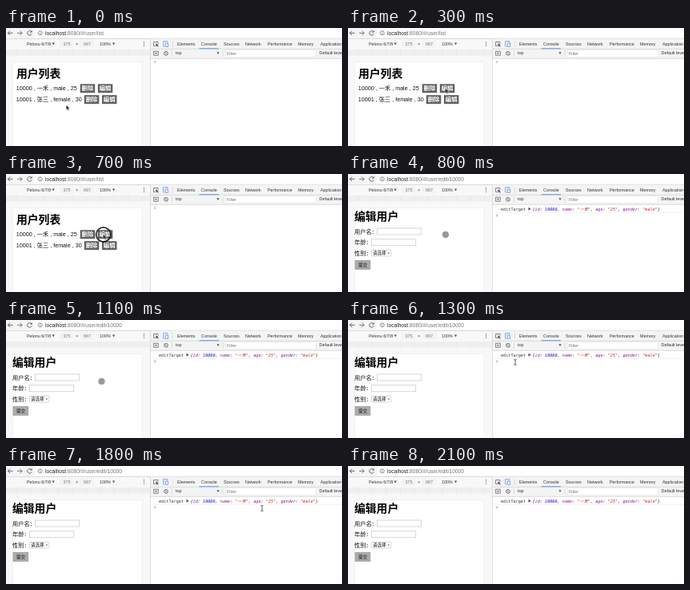
These frames come from a looping animation (420x148 px, 2300 ms). An HTML page:

```html
<!DOCTYPE html>
<html lang="zh-CN">
<head>
<meta charset="utf-8">
<title>User list</title>
<style>
  html, body { margin: 0; width: 100%; height: 100%; overflow: hidden; background: #fff; }
  svg { display: block; width: 420px; height: 148px; }
  text { font: 5.4px "Liberation Sans", "Noto Sans CJK SC", "Noto Sans CJK JP", sans-serif; fill: #333; white-space: pre; }
  .url { font-size: 6.65px; }
  .url, .dim { fill: #777; }
  .url tspan { fill: #222; }
  .page text { font-size: 7.2px; fill: #111; }
  .page .title { font-size: 13.8px; font-weight: 700; fill: #000; }
  .page .small { font-size: 5.5px; }
  .btn rect { fill: #606060; }
  .btn text { font-size: 7.4px; font-weight: 700; fill: #fff; text-anchor: middle; }
  .field { fill: #fff; stroke: #bbb; stroke-width: .6; }
  .log text { font: 5.17px "DejaVu Sans Mono", "Noto Sans CJK SC", "Noto Sans CJK JP", monospace; }
  .log .obj { font-style: italic; }
  .key { fill: #881391; }
  .num { fill: #1c00cf; }
  .str { fill: #c41a16; }
  .icon { fill: none; stroke: #666; stroke-width: .9; }
  .rule { fill: none; stroke: #d2d2d2; stroke-width: .7; }
  .tri { fill: #555; }

  .list, .edit, .arrow, .ring, .dot, .beam { animation: 2300ms step-end infinite; }
  .list { animation-name: list; }
  .edit { animation-name: edit; }
  .arrow { animation-name: arrow; }
  .ring { animation-name: ring; }
  .dot { animation-name: dot; }
  .beam { animation-name: beam; }

  @keyframes list {
    0% { visibility: visible; }
    34.782%, 100% { visibility: hidden; }
  }
  @keyframes edit {
    0% { visibility: hidden; }
    34.782%, 100% { visibility: visible; }
  }
  @keyframes arrow {
    0% { transform: translate(75.3px, 96.5px); visibility: visible; }
    4.347% { transform: translate(82px, 93px); visibility: visible; }
    8.695% { transform: translate(109px, 81px); visibility: visible; }
    13.043% { transform: translate(121.5px, 75.5px); visibility: visible; }
    34.782%, 100% { transform: translate(121.5px, 75.5px); visibility: hidden; }
  }
  @keyframes ring {
    0% { visibility: hidden; transform: translate(121.7px, 76px) scale(.6); }
    21.739% { visibility: visible; transform: translate(121.7px, 76px) scale(.75); }
    26.086% { visibility: visible; transform: translate(121.7px, 76px); }
    34.782%, 100% { visibility: hidden; transform: translate(121.7px, 76px); }
  }
  @keyframes dot {
    0% { visibility: hidden; transform: translate(122px, 76px); }
    34.782% { visibility: visible; transform: translate(122px, 76px); }
    43.478% { visibility: visible; transform: translate(121px, 76.5px); }
    47.826% { visibility: visible; transform: translate(119.5px, 77px); }
    52.173% { visibility: visible; transform: translate(148px, 69px); }
    56.521%, 100% { visibility: hidden; transform: translate(148px, 69px); }
  }
  @keyframes beam {
    0% { visibility: hidden; transform: translate(209px, 53px); }
    56.521% { visibility: visible; transform: translate(209px, 53px); }
    65.217% { visibility: visible; transform: translate(226.5px, 50px); }
    69.565% { visibility: visible; transform: translate(240px, 50px); }
    73.913% { visibility: visible; transform: translate(275px, 51px); }
    78.26% { visibility: visible; transform: translate(320px, 53px); }
    82.608% { visibility: visible; transform: translate(362px, 54px); }
    86.956% { visibility: visible; transform: translate(384px, 55px); }
    91.304%, 100% { visibility: hidden; transform: translate(384px, 55px); }
  }
</style>
</head>
<body>
<svg viewBox="0 0 420 148">
  <defs>
    <path id="down" class="tri" d="M0 0h3.2l-1.6 2.8z"/>
    <path id="prompt" d="M185.3 -1.5l1.5 1.5-1.5 1.5" fill="none" stroke="#4a78c8" stroke-width=".8"/>
    <g id="del" class="btn"><rect width="18.5" height="11"/><text x="9.25" y="8.2">删除</text></g>
    <g id="mod" class="btn"><rect width="18.5" height="11"/><text x="9.25" y="8.2">编辑</text></g>
    <pattern id="marks" width="17.5" height="8" x="-5" y="27" patternUnits="userSpaceOnUse">
      <rect width="17.5" height="8" fill="#efefef"/>
      <path d="M.5 0v8" stroke="#e2e2e2" stroke-width=".7"/>
    </pattern>
  </defs>

  <!-- address bar -->
  <rect width="420" height="148" fill="#fff"/>
  <rect width="420" height="13.5" fill="#f5f5f5"/>
  <rect x="36" y="-2" width="390" height="14" rx="2" fill="#fff"/>
  <g class="icon">
    <path d="M8.5 6.3H2.5M5 3.6L2.3 6.3 5 9" stroke="#555"/>
    <path d="M14 6.3h6M17.5 3.6L20.2 6.3l-2.7 2.7" stroke="#666"/>
    <path d="M31.8 4.7A2.8 2.8 0 1 0 32.2 7.3" stroke="#555"/>
    <path d="M32.6 2.9v2.7h-2.7z" fill="#555" stroke="none"/>
    <circle cx="42.8" cy="6.3" r="2.5" stroke-width=".7"/>
    <path d="M42.8 5.8v2M42.8 4.5v.7" stroke-width=".7"/>
  </g>

  <!-- device toolbar -->
  <rect y="13.5" width="180" height="13" fill="#f8f8f8"/>
  <path class="rule" d="M0 13.5h420"/>
  <text x="26" y="22">Pelonu 6/7/8</text>
  <use href="#down" x="57.6" y="18.6"/>
  <rect x="67" y="15.5" width="17" height="9" fill="#f3f3f3"/>
  <rect x="92" y="15.5" width="18" height="9" fill="#f3f3f3"/>
  <text class="dim" x="71.5" y="22">375</text>
  <text x="87" y="22">×</text>
  <text class="dim" x="97" y="22">667</text>
  <text x="117" y="22">100%</text>
  <use href="#down" x="133" y="18.6"/>
  <g fill="#666"><circle cx="172.5" cy="17.7" r=".65"/><circle cx="172.5" cy="20" r=".65"/><circle cx="172.5" cy="22.3" r=".65"/></g>
  <rect y="26.5" width="180" height="121.5" fill="#f8f8f8"/>
  <rect y="27" width="180" height="7.5" fill="url(#marks)"/>
  <rect x="8.5" y="42.5" width="161.5" height="110" fill="#fff" stroke="#eee" stroke-width=".8"/>

  <!-- devtools -->
  <rect x="180" y="13.5" width="240" height="25" fill="#f4f4f4"/>
  <path class="rule" d="M180.5 13.5V148M180 26.3h240M180 38.3h240M208.5 16v8M207.5 28v8M271 28v8"/>
  <path d="M241.5 25.8h24.5" stroke="#5c94e8" stroke-width="1"/>
  <g class="icon">
    <path d="M187 22.5h-2.4v-5h5.4v2" stroke-width=".8"/>
    <path d="M187 19.3l4 1.6-1.6.7 1.4 1.5-.7.7-1.4-1.5-.8 1.4z" fill="#555" stroke="none"/>
    <path d="M198.2 23h-1.5v-6.3h5.2v1.6M199.3 19h3.3v4.4h-3.3z" stroke="#5c94e8" stroke-width=".8"/>
    <rect x="184.7" y="29.2" width="5.5" height="5" stroke-width=".8"/>
    <path d="M186.7 30.4l2.2 1.3-2.2 1.3z" fill="#555" stroke="none"/>
    <circle cx="200" cy="31.8" r="2.4"/>
    <path d="M198.3 30.1l3.4 3.4"/>
  </g>
  <g>
    <text x="214" y="22">Elements</text>
    <text x="244" y="22">Console</text>
    <text x="272" y="22">Sources</text>
    <text x="299" y="22">Network</text>
    <text x="327" y="22">Performance</text>
    <text x="365" y="22">Memory</text>
    <text x="393" y="22">Application</text>
    <text x="212" y="33.4">top</text>
    <text x="391.5" y="33.4">Default levels</text>
  </g>
  <use href="#down" x="263.5" y="30.2"/>
  <rect x="274.3" y="27.8" width="113" height="8.8" fill="#fff" stroke="#e4e4e4" stroke-width=".6"/>
  <text class="dim" x="276" y="33.5">Filter</text>

  <g class="list">
    <text class="url" x="49" y="8.9"><tspan>localhost</tspan>:8080/#/user/list</text>
    <g class="page">
      <text class="title" x="13" y="62">用户列表</text>
      <text x="12.8" y="78.3">10000 , 一禾 , male , 25</text>
      <text x="12.8" y="92.2">10001 , 张三 , female , 30</text>
      <use href="#del" x="92.7" y="70.3"/>
      <use href="#mod" x="114.8" y="70.3"/>
      <use href="#del" x="97.8" y="84.2"/>
      <use href="#mod" x="120" y="84.2"/>
    </g>
    <use href="#prompt" y="42.7"/>
  </g>

  <g class="edit">
    <text class="url" x="49" y="8.9"><tspan>localhost</tspan>:8080/#/user/edit/10000</text>
    <g class="page">
      <text class="title" x="8" y="58">编辑用户</text>
      <text x="8" y="74.5">用户名：</text>
      <text x="8" y="88.3">年龄：</text>
      <text x="8" y="102">性别：</text>
      <rect class="field" x="36.3" y="68" width="55.5" height="8"/>
      <rect class="field" x="29.3" y="81.8" width="55.5" height="8"/>
      <rect class="field" x="29.3" y="95.3" width="24.5" height="7.8" rx="1"/>
      <text class="small" x="31" y="101.2">请选择</text>
      <path class="tri" d="M49.6 98.4h2.4l-1.2 1.8z"/>
      <rect x="8.5" y="108" width="19.7" height="12" fill="#aaa"/>
      <text class="small" x="13" y="116.1">提交</text>
    </g>
    <g class="log">
      <text x="191" y="45.6">editTarget</text>
      <path class="tri" d="M225.5 41.8l3.3 2-3.3 2z"/>
      <text class="obj" x="230.5" y="45.6">{<tspan class="key">id</tspan>: <tspan class="num">10000</tspan>, <tspan class="key">name</tspan>: <tspan class="str">"一禾"</tspan>, <tspan class="key">age</tspan>: <tspan class="str">"25"</tspan>, <tspan class="key">gender</tspan>: <tspan class="str">"male"</tspan>}</text>
      <path d="M181 48.3h239" stroke="#eee" stroke-width=".7"/>
    </g>
    <use href="#prompt" y="52"/>
  </g>

  <!-- pointers -->
  <circle class="ring" r="9" fill="none" stroke="#111" stroke-width="1.6"/>
  <path class="arrow" d="M0 0v6.2l1.4-1.3 1 2.3 1.1-.5-1-2.2h1.9z" fill="#000" stroke="#fff" stroke-width=".5"/>
  <circle class="dot" r="3.8" fill="#999" stroke="#858585" stroke-width=".7"/>
  <path class="beam" d="M-1.5-3.5q1.5 0 1.5 1 0-1 1.5-1M0-2.5v5M-1.5 3.5q1.5 0 1.5-1 0 1 1.5 1" fill="none" stroke="#333" stroke-width=".8"/>
</svg>
</body>
</html>
```
